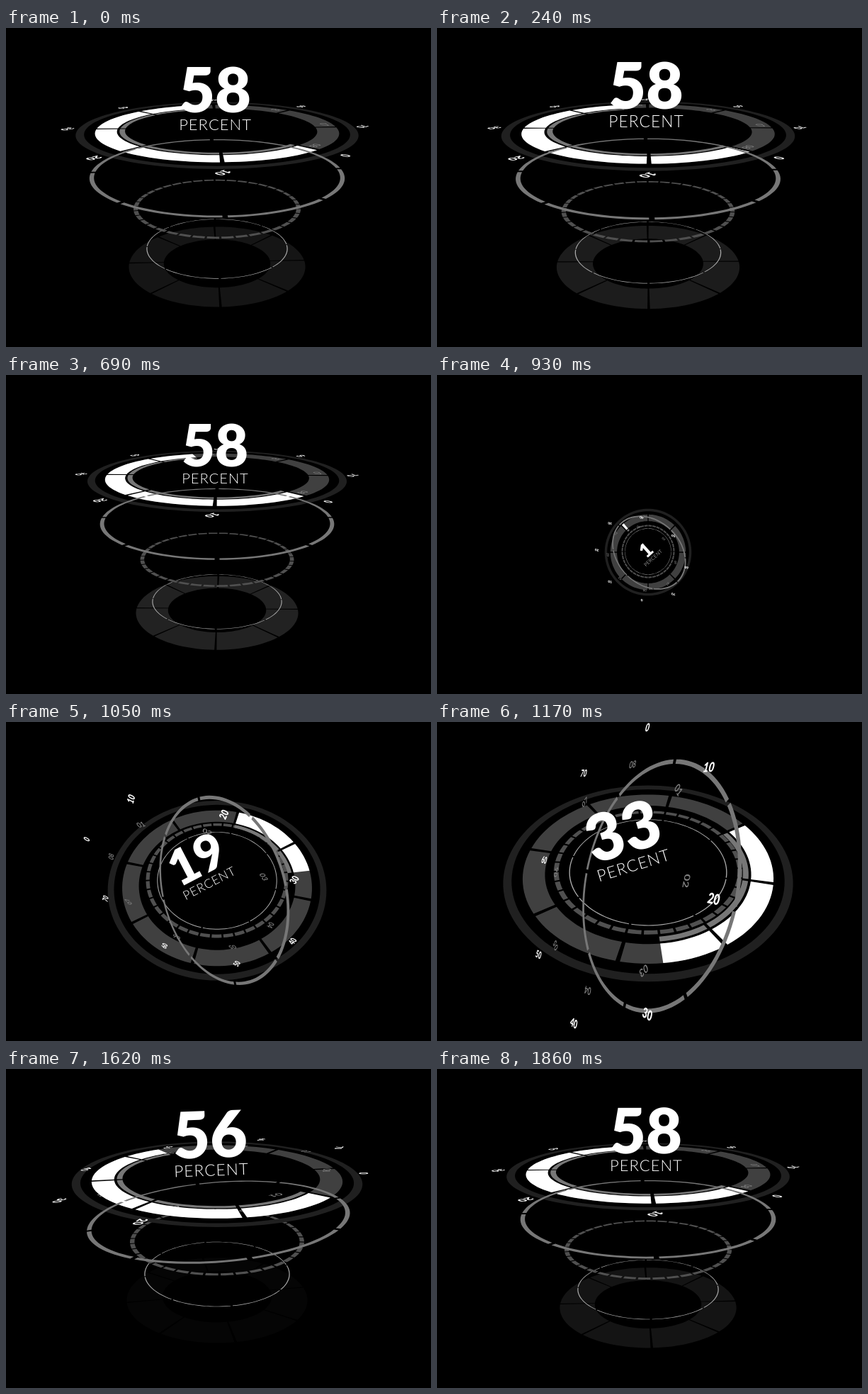
An HTML page with a canvas for the animation above (1890 ms loop, 600 by 450 pixels).

```html
<!DOCTYPE html>
<html lang="en">
<head>
<meta charset="utf-8">
<title>Percent rings</title>
<style>
  html, body { margin: 0; width: 100%; height: 100%; overflow: hidden; background: #000; }
  canvas { display: block; width: 600px; height: 450px; }
</style>
</head>
<body>
<canvas id="stage" width="600" height="450"></canvas>
<script>
const ctx = document.getElementById('stage').getContext('2d');
const LOOP = 1890, STEP = 30, INTRO = 920, CX = 298;
const KEYS = [930, 1170, 1410, 1890];
const RAD = Math.PI / 180;
let clock = 0;

const clamp = (v, lo = 0, hi = 1) => Math.min(hi, Math.max(lo, v));
const smooth = x => (1 - Math.cos(Math.PI * clamp(x))) / 2;

// Monotone cubic through the intro poses; the last pose holds in the outro.
function pose(...v) {
  if (clock < INTRO) return v[3];
  const t = clamp(clock, KEYS[0], KEYS[3]);
  const i = t < KEYS[1] ? 0 : t < KEYS[2] ? 1 : 2;
  const slope = k => (v[k + 1] - v[k]) / (KEYS[k + 1] - KEYS[k]);
  const tangent = k => {
    if (k === 0) return slope(0) * 1.3;
    if (k === 3) return 0;
    const a = slope(k - 1), b = slope(k);
    return a * b <= 0 ? 0 : 2 * a * b / (a + b);
  };
  const d = KEYS[i + 1] - KEYS[i], x = (t - KEYS[i]) / d, x2 = x * x, x3 = x2 * x;
  return v[i] * (2 * x3 - 3 * x2 + 1) + tangent(i) * d * (x3 - 2 * x2 + x)
    + v[i + 1] * (3 * x2 - 2 * x3) + tangent(i + 1) * d * (x3 - x2);
}

// Swells slightly, then collapses to nothing.
function outroScale() {
  if (clock >= INTRO) return 1;
  if (clock < 495) return 1 + 0.075 * smooth(clock / 495);
  return 1.075 * (1 - Math.pow((clock - 495) / 425, 2.49));
}

function percent() {
  if (clock < INTRO) return 58;
  const x = clamp((clock - 922) / 1034);
  return 58 * (1 - Math.pow(1 - x, 3));
}

// A plane seen in perspective; the second axis points to the viewer.
function plane(x, y, len1, angle1, len2, angle2) {
  const k = Math.min(1, len2 / len1 || 0);
  return {
    x, y,
    ux: len1 * Math.cos(angle1 * RAD), uy: len1 * Math.sin(angle1 * RAD),
    vx: len2 * Math.cos(angle2 * RAD), vy: len2 * Math.sin(angle2 * RAD),
    h: 0.0012 * len1 * Math.sqrt(1 - k * k)
  };
}
const flat = (y, scale, k) => plane(CX, y, scale, 0, scale * k, 90);

function project(p, a, b) {
  const w = 1 - p.h * b;
  return [p.x + (p.ux * a + p.vx * b) / w, p.y + (p.uy * a + p.vy * b) / w];
}

function arc(p, r, from, to) {
  const n = Math.max(1, Math.ceil(Math.abs(to - from) / 3));
  for (let i = 0; i <= n; i++) {
    const a = (from + (to - from) * i / n) * RAD;
    ctx.lineTo(...project(p, r * Math.cos(a), r * Math.sin(a)));
  }
}

function ring(p, inner, outer, color, count = 1, gap = 0, spin = 0, sweep = 360) {
  const step = 360 / count;
  ctx.fillStyle = color;
  ctx.beginPath();
  for (let i = 0; i < count; i++) {
    const from = i * step + gap / 2;
    const to = Math.min((i + 1) * step - gap / 2, sweep);
    if (to <= from) break;
    const start = project(p, outer * Math.cos((spin + from) * RAD), outer * Math.sin((spin + from) * RAD));
    ctx.moveTo(...start);
    arc(p, outer, spin + from, spin + to);
    arc(p, inner, spin + to, spin + from);
    ctx.closePath();
  }
  ctx.fill();
}

// Text lying in a plane; x and down axes are angles inside that plane.
function planeText(p, text, r, angle, xAngle, downAngle) {
  const a = r * Math.cos(angle * RAD), b = r * Math.sin(angle * RAD);
  const w = 1 - p.h * b, [x, y] = project(p, a, b);
  const dir = deg => {
    const da = Math.cos(deg * RAD), db = Math.sin(deg * RAD);
    return [
      (p.ux * da + p.vx * db + p.h * (x - p.x) * db) / w,
      (p.uy * da + p.vy * db + p.h * (y - p.y) * db) / w
    ];
  };
  ctx.setTransform(...dir(xAngle), ...dir(downAngle), x, y);
  ctx.fillText(text, 0, 0);
  ctx.resetTransform();
}

function innerLabels(p, spin) {
  ctx.fillStyle = '#808080';
  ctx.font = '700 14px Lato, sans-serif';
  for (let i = 0; i < 8; i++) {
    const angle = spin + i * 45;
    planeText(p, '0' + (i || 8), 157, angle, angle + 90, angle + 180);
  }
}

function outerLabels(p, spin) {
  ctx.fillStyle = '#fff';
  ctx.font = '900 16px Lato, sans-serif';
  for (let i = 0; i < 8; i++) {
    planeText(p, String(i * 10), 208, spin + i * 45, spin + 90, spin + 180);
  }
}

function title(scale, value) {
  const s = scale * pose(0.31, 1.04, 1.05, 1);
  ctx.translate(pose(305, 277, 283, 295), pose(258, 202, 154, 136) - (scale - 1) * 115);
  ctx.rotate(pose(-42, -17, -5.5, 0) * RAD);
  ctx.scale(s, s);
  ctx.fillStyle = '#fff';
  ctx.textBaseline = 'alphabetic';
  ctx.font = '900 88px Lato, sans-serif';
  ctx.fillText(String(Math.round(value)), 0, -17);
  ctx.font = '300 22px Lato, sans-serif';
  ctx.letterSpacing = '1px';
  ctx.fillText('PERCENT', 0.5, 8);
  ctx.letterSpacing = '0px';
  ctx.resetTransform();
}

function draw() {
  const s = outroScale(), value = percent(), sweep = value * 3.6;
  const outro = clock < INTRO;
  const settle = outro ? smooth(clock / 450) : 0;
  const spin = pose(-135, -33, 20, 43) + 3 * settle;

  ctx.fillStyle = '#000';
  ctx.fillRect(0, 0, 600, 450);
  ctx.textAlign = 'center';
  ctx.textBaseline = 'middle';

  const base = flat(pose(250, 250, 300, 329.5), s * pose(0.31, 1, 1.04, 1), pose(1, 0.7, 0.5, 0.45));
  ctx.globalAlpha = outro ? 0.62 + 0.38 * settle : 0.62 * smooth((clock - 1480) / 410);
  ring(base, 75, 123.5, '#222', 8, 1.4, spin);
  ctx.globalAlpha = 1;

  const thin = flat(pose(249, 205, 253, 307) + 9 * settle, s * pose(0.33, 1.12, 1.07, 1), pose(1, 0.67, 0.485, 0.42));
  ring(thin, 97.9, 99.1, '#aaa', 8, 1.6, spin);

  const dashed = flat(pose(249, 202, 222, 250) + 6 * settle, s * pose(0.32, 1.13, 1.09, 1), pose(1, 0.65, 0.43, 0.35));
  ring(dashed, 111, 117, '#505050', 40, 1.4, spin);

  const dial = flat(pose(250, 203, 162, 141), s * pose(0.315, 1.035, 1.046, 1), pose(1, 0.665, 0.379, 0.23));
  const labels = plane(
    pose(289, 245, 290, 296), pose(259, 217, 151, 140.5),
    s * pose(0.28, 1.034, 1.024, 1), pose(-270, -76, -11, 0),
    s * pose(0.31, 0.5625, 0.34, 0.231), pose(-169, 13, 123, 90));
  const labelSpin = pose(0, 0, 0, 43) + 3.3 * settle;

  ring(dial, 183.5, 194.5, '#202020');
  ring(dial, 139.5, 169, '#404040', 8, 1.8, spin);
  innerLabels(labels, labelSpin - 5);
  ring(dial, 128.5, 136, '#777', 8, 1.8, spin, sweep);
  ring(dial, 139.5, 169, '#fff', 8, 1.8, spin, sweep);

  const hoop = plane(
    pose(298, 299, 301, 298), pose(252, 233, 210, 201),
    s * pose(0.33, 1.003, 1.054, 1), pose(-135, -85, -12, 0),
    s * pose(0.256, 0.615, 0.33, 0.3), pose(-45, -4, 90, 90));
  ring(hoop, 170.5, 176.5, '#777', 8, 2, spin - 1);

  outerLabels(labels, labelSpin);
  title(s, value);
}

function frame() {
  clock = Math.floor(performance.now() % LOOP / STEP) * STEP;
  draw();
  requestAnimationFrame(frame);
}
frame();
</script>
</body>
</html>
```
